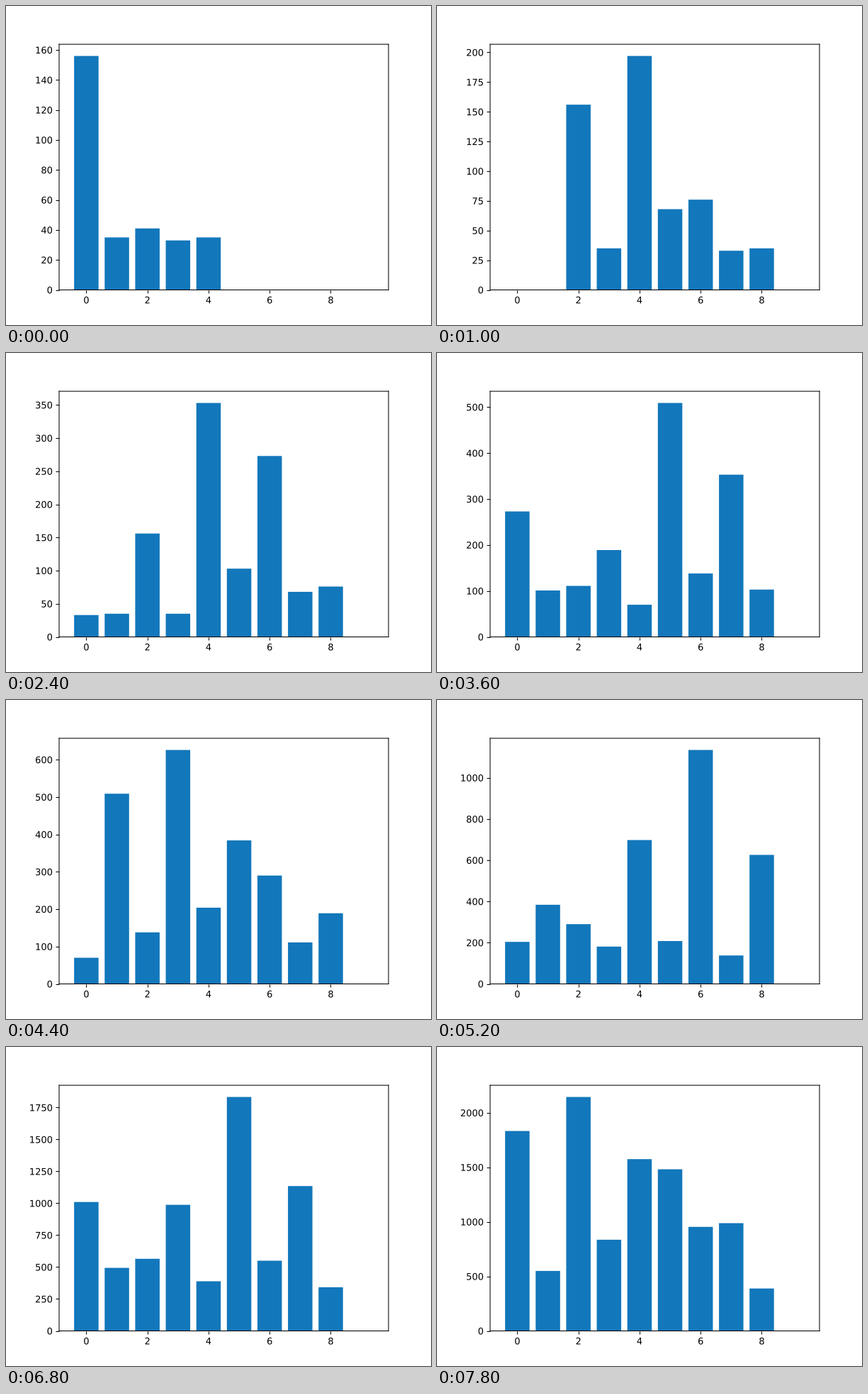
Write a matplotlib script that moves like this. It is 600 px wide and 450 px high and loops after 8 s.

```python
import matplotlib.pyplot as plt
from matplotlib.animation import FuncAnimation
from matplotlib.patheffects import Normal

FRAMES = 40
STEP_MS = 200
START = [156, 35, 41, 33, 35, 0, 0, 0, 0]
BLUE = "#1277bb"

# Outline text and unsnapped edges keep sub-pixel positions.
plt.rcParams.update({"path.snap": False, "path.effects": [Normal()],
                     "text.hinting": "none"})


def next_day(counts):
    """Every timer drops by one; those at 0 restart at 6 and add as many at 8."""
    spawning, *rest = counts
    rest[6] += spawning
    return rest + [spawning]


days = [START]
while len(days) < FRAMES:
    days.append(next_day(days[-1]))

fig, ax = plt.subplots(figsize=(6.4, 4.8), dpi=93.75)
bars = ax.bar(range(10), START + [0], color=BLUE, linewidth=0)


def draw(i):
    counts = days[i] + [0]
    for bar, count in zip(bars, counts):
        bar.set_height(count)
    ax.set_ylim(0, max(counts) * 1.05)
    return bars.patches


anim = FuncAnimation(fig, draw, frames=FRAMES, init_func=lambda: draw(0),
                     interval=STEP_MS, repeat=True, repeat_delay=0, blit=False)
plt.show()
```
